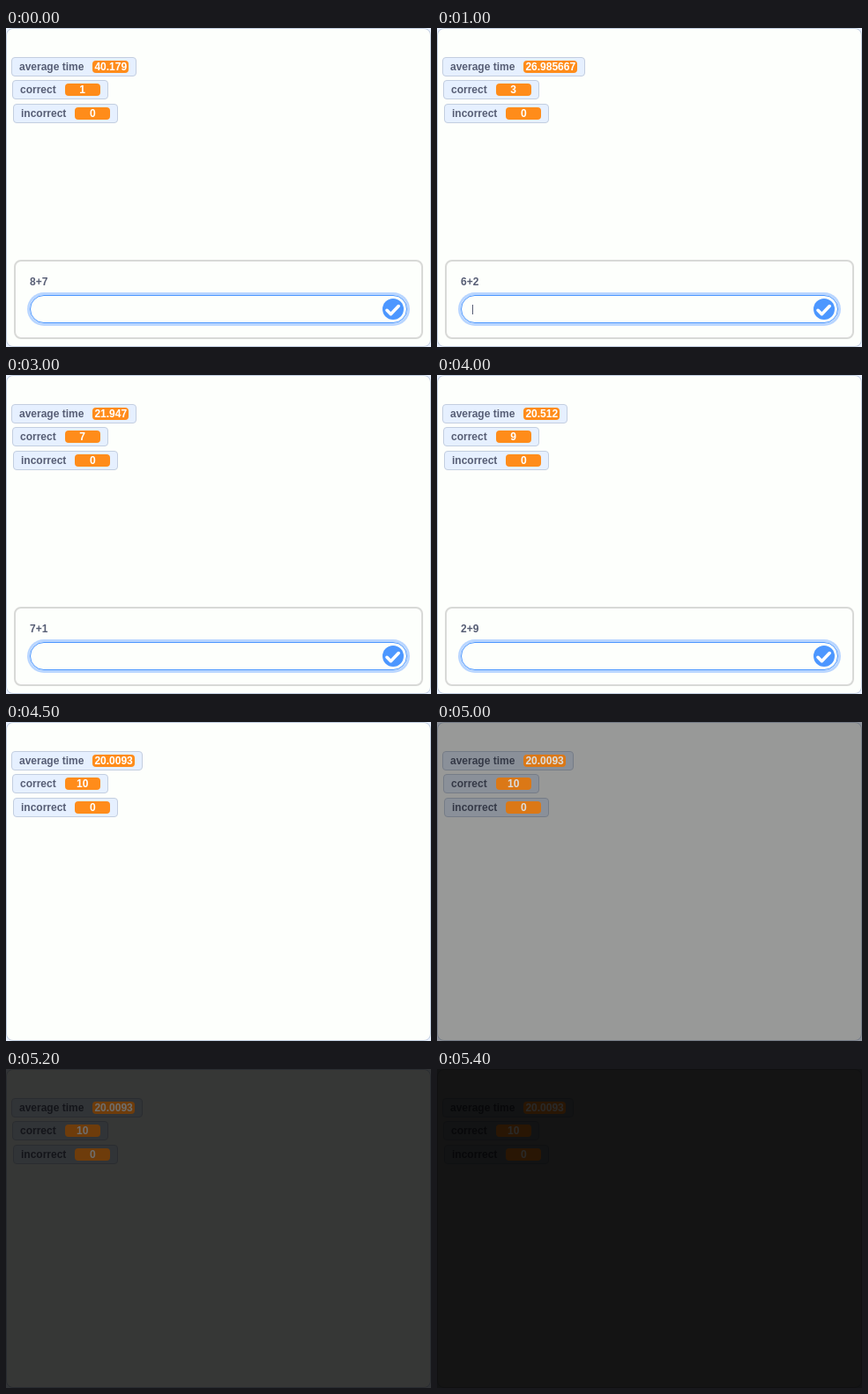
An HTML page that plays this animation: 482x362 px, repeating every 5.5 s.

```html
<!DOCTYPE html>
<html lang="en">
<head>
<meta charset="utf-8">
<title>Addition quiz</title>
<style>
  * { box-sizing: border-box; }
  html, body { margin: 0; width: 100%; height: 100%; overflow: hidden; background: #e8f0ff; }
  body { font: bold 12px/14px "Liberation Sans", Arial, sans-serif; color: #575e75; }
  div, svg { position: absolute; }
  #stage { left: 0; top: 0; width: 482px; height: 362px; border: 1px solid #c0cddf; border-radius: 8px; background: #fdfffc; }
  .monitor { display: flex; height: 22px; padding: 3px; border: 1px solid #c3cee0; border-radius: 4px; background: #e6f0ff; white-space: nowrap; }
  .monitor span { margin: 0 5px; }
  .monitor .value { position: relative; z-index: 2; min-width: 40px; padding: 0 2px; border-radius: 4px; background: #ff8c1a; color: #fff; text-align: center; }
  #panel { left: 9px; top: 263px; width: 464px; height: 90px; border: 2px solid #d8d9d7; border-radius: 8px; }
  #question { left: 16px; top: 16px; }
  #input { left: 16px; top: 38px; width: 428px; height: 32px; border: 1px solid #4c97ff; border-radius: 16px; box-shadow: 0 0 0 3px #b9d6ff; }
  #caret { left: 12px; top: 10px; width: 1px; height: 11px; background: #575e75; }
  #input svg { right: 3px; top: 3px; }
  #shade { left: 0; top: 0; width: 482px; height: 362px; background: #000; z-index: 1; }
</style>
</head>
<body>
<div id="stage"></div>
<div class="monitor" style="left:6px;top:33px"><span>average time</span><span class="value" id="average"></span></div>
<div class="monitor" style="left:7px;top:59px"><span>correct</span><span class="value" id="correct"></span></div>
<div class="monitor" style="left:8px;top:86px"><span>incorrect</span><span class="value">0</span></div>
<div id="panel">
  <div id="question"></div>
  <div id="input">
    <div id="caret"></div>
    <svg width="24" height="24">
      <circle cx="12" cy="12" r="12" fill="#4c97ff"/>
      <path d="M5 13.3l4.4 4.4L18.2 8.6" fill="none" stroke="#fff" stroke-width="3.6" stroke-linecap="round" stroke-linejoin="round"/>
    </svg>
  </div>
</div>
<div id="shade"></div>
<script>
const LOOP = 5500, ROUND = 500, FADE_START = 5000;
// question, running average, caret visible
const rounds = [
  ["8+7", "40.179", 0], ["3+4", "31.152", 1], ["6+2", "26.985667", 1],
  ["9+5", "24.413", 1], ["9+3", "23.0824", 1], ["4+6", "22.497", 1],
  ["7+1", "21.947", 0], ["5+8", "21.166125", 1], ["2+9", "20.512", 0],
  ["", "20.0093", 0]
];
// the orange readouts darken more slowly than the page
const valueLight = [1, .86, .62, .43, .27, .16];

const $ = id => document.getElementById(id);
const values = document.querySelectorAll(".value");
const show = (el, on) => el.style.visibility = on ? "visible" : "hidden";
const start = performance.now();

function draw() {
  const t = (performance.now() - start) % LOOP;
  const n = Math.min(rounds.length - 1, Math.floor(t / ROUND));
  const [question, average, caret] = rounds[n];
  $("average").textContent = average;
  $("correct").textContent = n + 1;
  $("question").textContent = question;
  show($("panel"), question);
  show($("caret"), caret);

  const step = t < FADE_START ? 0 : 1 + Math.floor((t - FADE_START) / 100);
  $("shade").style.opacity = 1 - 0.6 ** step;
  for (const v of values) v.style.filter = step ? `brightness(${valueLight[step]})` : "none";
  requestAnimationFrame(draw);
}
draw();
</script>
</body>
</html>
```
